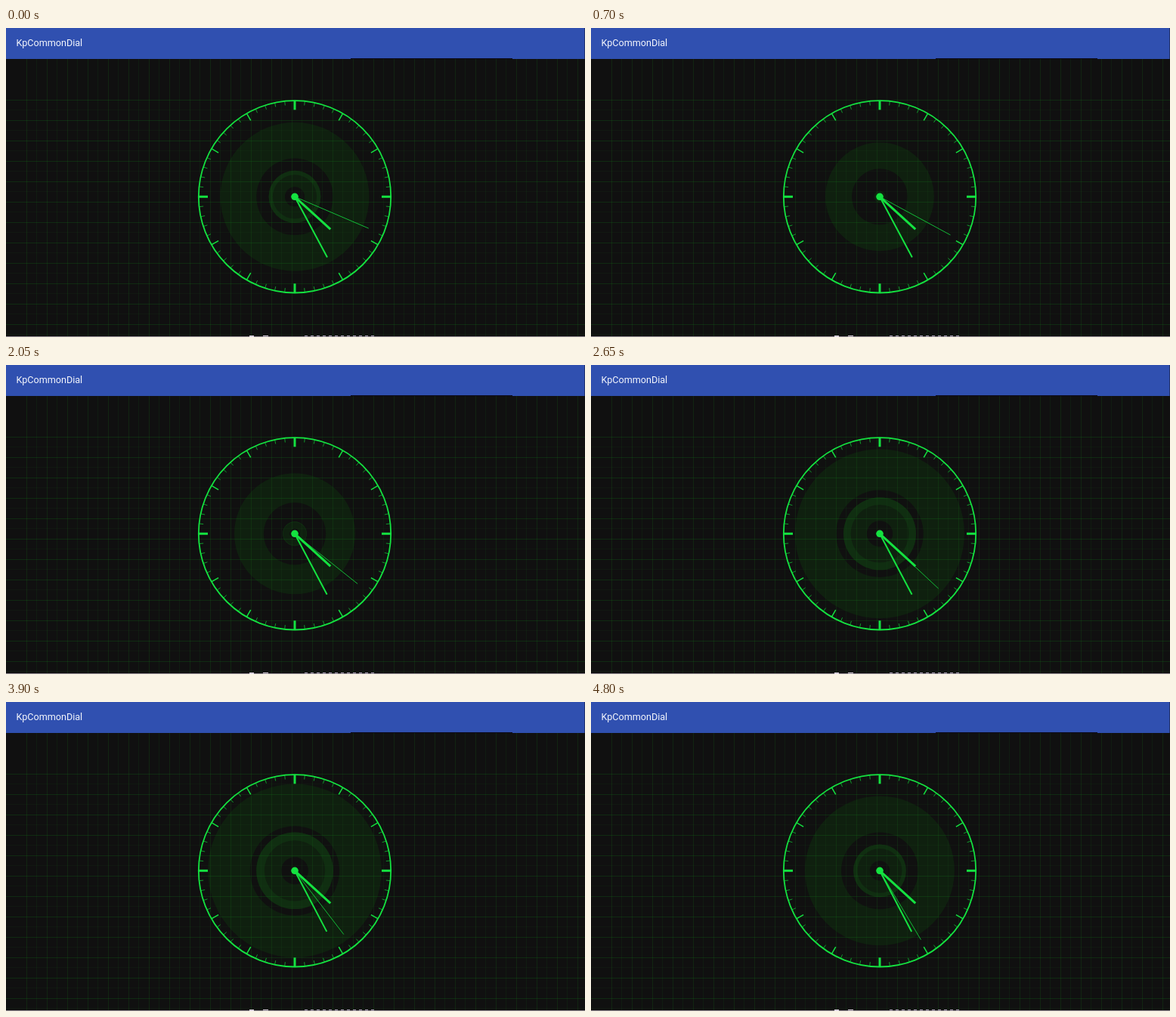
These frames come from a looping animation (766x409 px, 4.85 s). An HTML page with a canvas:

```html
<!DOCTYPE html>
<html lang="en">
<head>
<meta charset="utf-8">
<title>Clock</title>
<style>
  html, body { margin: 0; width: 100%; height: 100%; overflow: hidden; background: #101010; }
  canvas { display: block; }
</style>
</head>
<body>
<canvas id="stage" width="766" height="409"></canvas>
<script>
const ctx = document.getElementById('stage').getContext('2d');
const W = 766, H = 409, BAR = 41;
const CX = 382, CY = 223.3, DIAL = 127.2;
const LOOP = 4850, STEP = 50;
const GREEN = '#14e240', TAU = Math.PI * 2, DEG = Math.PI / 180;

function rect(color, x, y, w, h) {
  ctx.fillStyle = color;
  ctx.fillRect(x, y, w, h);
}

function ray(degrees, from, to, width, color = GREEN) {
  const c = Math.cos(degrees * DEG), s = Math.sin(degrees * DEG);
  ctx.strokeStyle = color;
  ctx.lineWidth = width;
  ctx.beginPath();
  ctx.moveTo(CX + c * from, CY + s * from);
  ctx.lineTo(CX + c * to, CY + s * to);
  ctx.stroke();
}

function disc(radius, color) {
  ctx.fillStyle = color;
  ctx.beginPath();
  ctx.arc(CX, CY, radius, 0, TAU);
  ctx.fill();
}

function band(inner, outer, color) {
  if (inner >= outer) return;
  ctx.fillStyle = color;
  ctx.beginPath();
  ctx.arc(CX, CY, outer, 0, TAU);
  ctx.arc(CX, CY, inner, 0, TAU, true);
  ctx.fill();
}

// Two overlapping discs, each fading toward its centre, in two flat tones.
function drawRipples(t) {
  const phase = (12.92 / 24 + t / 1198) % 1;
  const young = 64 * phase, old = 64 + young;
  const slope = 1 / old + (young > 0 ? 1 / young : 0);
  band(old * 0.515, old, '#0f200f');
  band(0.51 / slope, Math.min(young, old * 0.515), '#0f200f');
  band(1.14 / slope, young, '#102e11');
}

function drawGrid() {
  for (let i = 0, x = 27; x < W; i++, x += 13.5)
    rect(i % 2 ? 'rgba(24,80,28,.2)' : 'rgba(20,100,26,.25)', Math.floor(x), BAR, 1, H - BAR);
  for (let i = 0, y = 95; y < H; i++, y += 13.5)
    rect(i % 2 ? 'rgba(24,80,28,.12)' : 'rgba(20,110,26,.29)', 0, Math.floor(y), W, 1);
}

function drawFrame() {
  rect('#3050b0', 0, 0, W, BAR);
  rect('#0c0c20', 456, BAR - 1, 214, 1);
  rect('#20306c', W - 1, 0, 1, BAR);
  ctx.fillStyle = '#f4f6fc';
  ctx.font = '12.6px Roboto, sans-serif';
  ctx.fillText('KpCommonDial', 13.5, 24);
  rect('#8c858c', 0, H - 1, W, 1);
  rect('#d8d0dc', 322, H - 2, 6, 2);
  rect('#d8d0dc', 340, H - 2, 7, 1);
  for (let x = 395; x < 488; x += 8) rect('#a8a0b4', x, H - 2, 4, 1);
}

function drawDial() {
  for (let i = 0; i < 60; i++) {
    if (i % 15 === 0) ray(i * 6, 115, DIAL, 3);
    else if (i % 5 === 0) ray(i * 6, 116.5, DIAL, 1.5);
    else ray(i * 6, 121.5, DIAL, 1, '#109a2c');
  }
  ctx.strokeStyle = GREEN;
  ctx.lineWidth = 1.8;
  ctx.beginPath();
  ctx.arc(CX, CY, DIAL, 0, TAU);
  ctx.stroke();
}

function drawHands(t) {
  const turn = t * 0.0075;
  ray(42.4, 0, 64, 3);
  ray(61.8 + turn / 60, 0, 91, 2);
  ray(23.2 + turn, 0, 106.3, 0.8);
  disc(4.8, GREEN);
}

function render(now) {
  const t = Math.floor((now % LOOP) / STEP) * STEP;
  rect('#101010', 0, 0, W, H);
  drawRipples(t);
  drawGrid();
  drawFrame();
  drawDial();
  drawHands(t);
}

const start = performance.now();
function tick() {
  render(performance.now() - start);
  requestAnimationFrame(tick);
}
tick();
</script>
</body>
</html>
```
